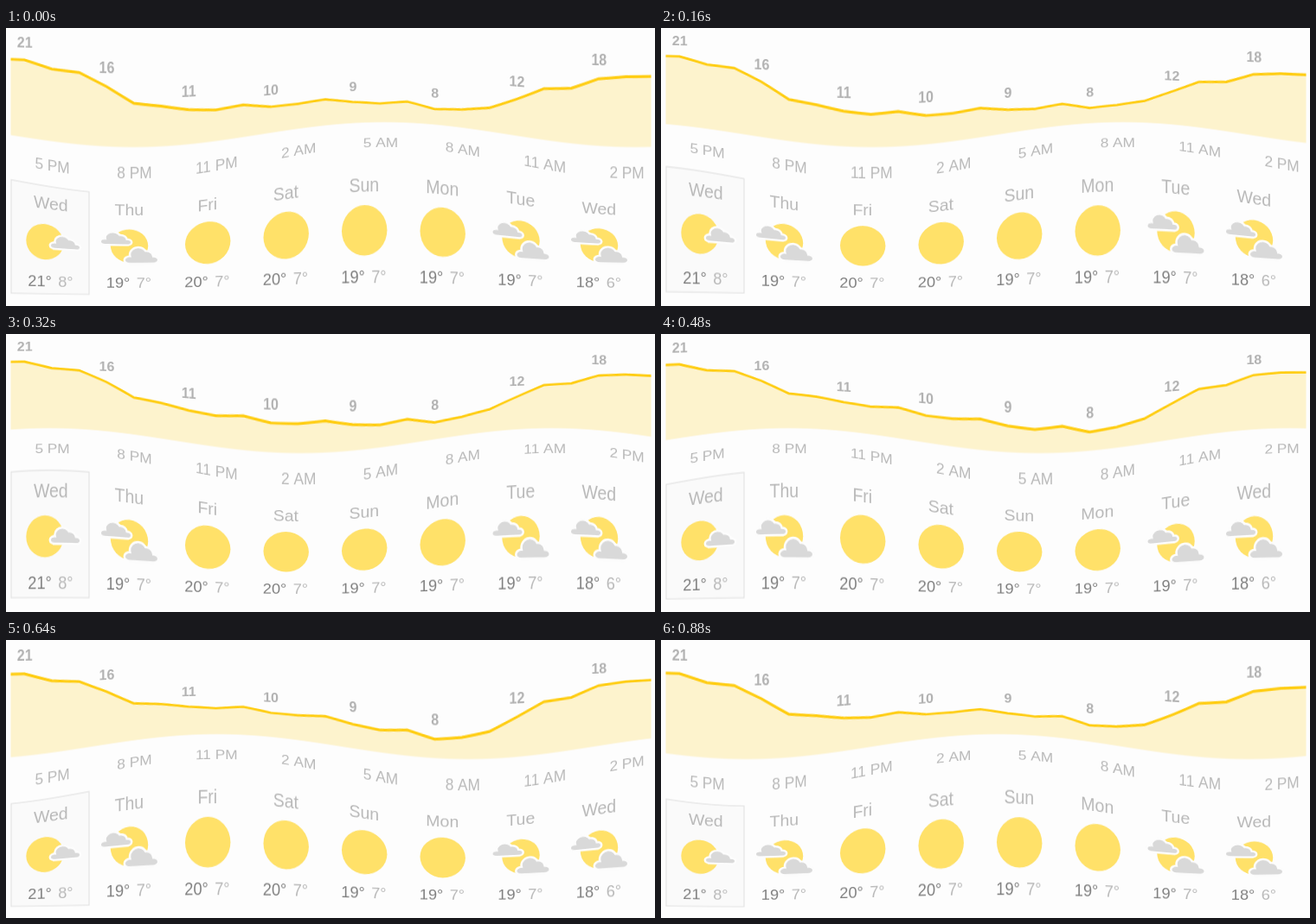
These frames come from a looping animation (750x322 px, 960 ms). An HTML page with a canvas:

```html
<!DOCTYPE html>
<html lang="en">
<head>
<meta charset="utf-8">
<title>Waving forecast</title>
<style>
html, body { margin: 0; width: 100%; height: 100%; overflow: hidden; background: #fdfdfd; }
canvas { display: block; }
</style>
</head>
<body>
<canvas id="stage" width="750" height="322"></canvas>
<script>
const W = 750, H = 322, MID = H / 2;
const STEPS = 12, STEP_MS = 80, WAVELENGTH = 580, CREST = 437, SWING = 0.117;
const BG = '#fdfdfd', SUN = '#ffe169', CLOUD = '#d9d9d9', LIGHT = '#b9b9b9', DARK = '#808080';
const FONT = 'Arial, "Liberation Sans", sans-serif';

const stage = document.getElementById('stage').getContext('2d');
const flat = document.createElement('canvas');
flat.width = W;
flat.height = H;
const g = flat.getContext('2d');

function text(str, x, y, size, color, align = 'center', weight = '') {
  g.font = `${weight} ${size}px ${FONT}`;
  g.textAlign = align;
  g.fillStyle = color;
  g.fillText(str, x, y);
}

function sun(x, y, r) {
  g.fillStyle = SUN;
  g.beginPath();
  g.arc(x, y, r, 0, Math.PI * 2);
  g.fill();
}

function cloud(x, y, w, h) {
  const shape = new Path2D();
  const lumps = [[.14, .81, .14, .19], [.4, .45, .23, .45], [.65, .62, .19, .36], [.86, .82, .14, .18]];
  for (const [cx, cy, rx, ry] of lumps) {
    const lump = new Path2D();
    lump.ellipse(x + cx * w, y + cy * h, rx * w, ry * h, 0, 0, Math.PI * 2);
    shape.addPath(lump);
  }
  shape.rect(x + .14 * w, y + .67 * h, .72 * w, .33 * h);
  g.strokeStyle = BG;
  g.lineWidth = 5;
  g.stroke(shape);
  g.fillStyle = CLOUD;
  g.fill(shape);
}

const icons = {
  clear: x => sun(x + .7, 243.2, 26.2),
  hazy: x => {
    sun(x - 6.5, 243.5, 21.7);
    cloud(x + .5, 235.5, 33, 14.5);
  },
  cloudy: x => {
    sun(x + .5, 243.2, 21.7);
    cloud(x - 32, 226.5, 34, 14.5);
    cloud(x - 4, 246.3, 37, 19);
  }
};

function drawChart() {
  const heights = [36, 44.8, 47.2, 61, 78, 81.5, 86.7, 89.5, 87, 92.8, 93, 90.6,
    95.9, 99, 96, 103.7, 101, 95.3, 81.5, 67, 64.5, 53.2, 50.4, 50.2];
  const line = new Path2D('M5.5 36');
  heights.forEach((y, i) => line.lineTo(Math.min(21.3 + 31.6 * i, 745.5), y));
  const area = new Path2D(line);
  area.lineTo(745.5, 123.6);
  area.lineTo(5.5, 123.6);
  g.fillStyle = '#fdf3cd';
  g.fill(area);
  g.strokeStyle = '#ffcd12';
  g.lineWidth = 3;
  g.stroke(line);

  const marks = [[21, 16.3], [16, 41], [11, 67.5], [10, 72.8], [9, 76], [8, 83], [12, 61.5], [18, 33.6]];
  marks.forEach(([value, y], i) => text(value, 21.7 + 94.8 * i, y + 5.7, 16, '#b2b2b2', 'center', 'bold'));
  ['5 PM', '8 PM', '11 PM', '2 AM', '5 AM', '8 AM', '11 AM', '2 PM']
    .forEach((hour, i) => text(hour, 53.6 + 94.85 * i, 156.2, 17.3, LIGHT));
}

function drawDays() {
  g.fillStyle = '#fafafa';
  g.fillRect(6, 175, 90, 132);
  g.strokeStyle = '#e0e0e0';
  g.lineWidth = 1;
  g.strokeRect(6, 175, 90, 132);

  const days = [
    ['Wed', 'hazy', 21, 8], ['Thu', 'cloudy', 19, 7], ['Fri', 'clear', 20, 7], ['Sat', 'clear', 20, 7],
    ['Sun', 'clear', 19, 7], ['Mon', 'clear', 19, 7], ['Tue', 'cloudy', 19, 7], ['Wed', 'cloudy', 18, 6]
  ];
  days.forEach(([name, icon, high, low], i) => {
    const x = 51.5 + 90.5 * i;
    text(name, x + .3, 202.7, 19.5, LIGHT);
    icons[icon](x);
    text(high + '°', x - 26.2, 298, 18.2, DARK, 'left');
    text(low + '°', x + 8.7, 298, 18.2, LIGHT, 'left');
  });
}

// Each column's midpoint rides a travelling wave; both halves stretch to follow it.
function drawWave(step) {
  stage.fillStyle = BG;
  stage.fillRect(0, 0, W, H);
  const crest = CREST + WAVELENGTH * step / STEPS;
  for (let x = 0; x < W; x++) {
    const mid = MID * (1 - SWING * Math.cos((x + .5 - crest) / WAVELENGTH * Math.PI * 2));
    stage.drawImage(flat, x, 0, 1, MID, x, 0, 1, mid);
    stage.drawImage(flat, x, MID, 1, MID, x, mid, 1, H - mid);
  }
}

g.fillStyle = BG;
g.fillRect(0, 0, W, H);
drawChart();
drawDays();

let shown = -1;
function tick() {
  const step = Math.floor(performance.now() / STEP_MS) % STEPS;
  if (step !== shown) drawWave(shown = step);
  requestAnimationFrame(tick);
}
tick();
</script>
</body>
</html>
```
